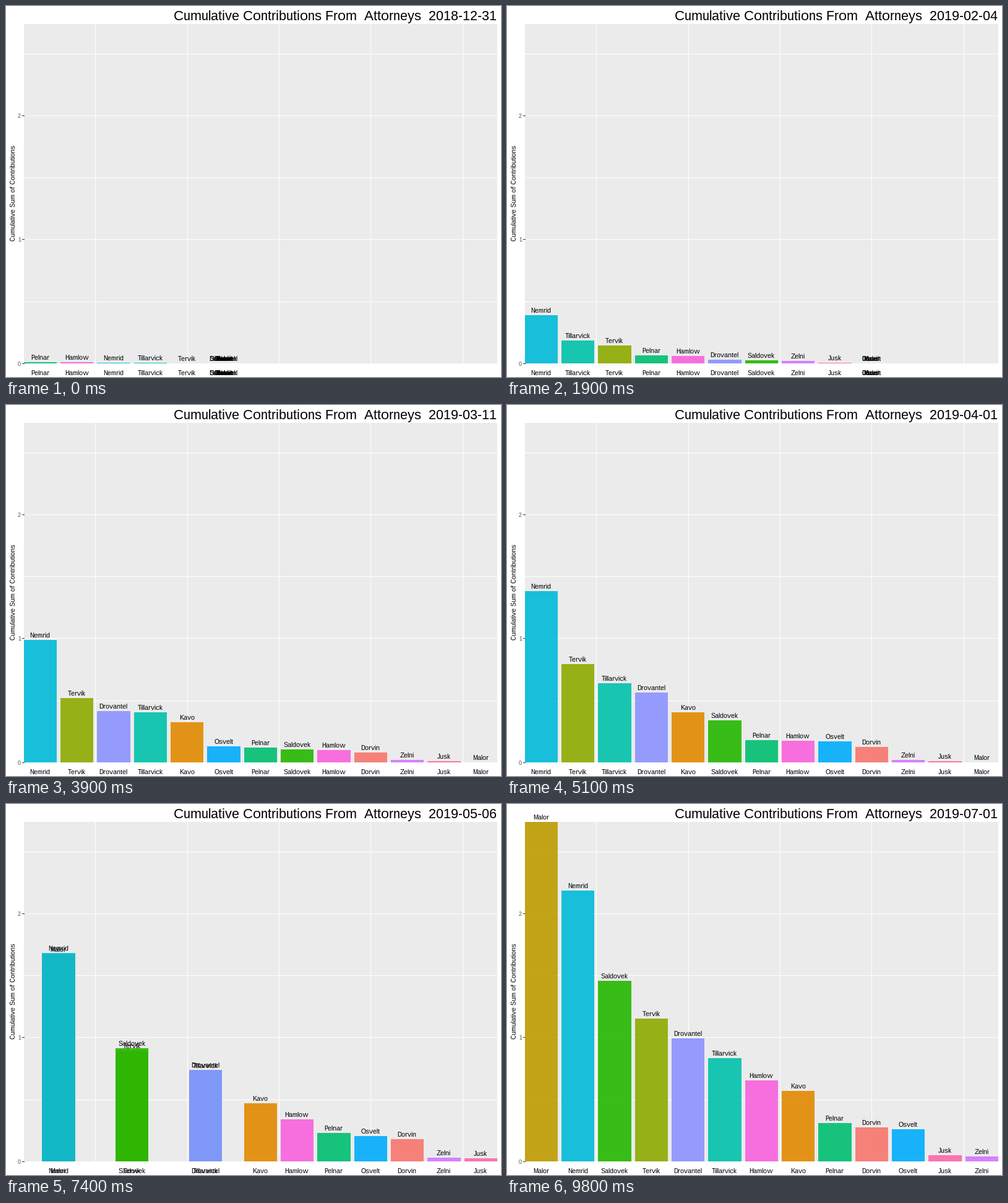
Write a matplotlib script that moves like this. It is 800x600 px and loops after 10000 ms.

```python
import numpy as np
import matplotlib.pyplot as plt
from matplotlib.animation import FuncAnimation
from matplotlib.patches import Rectangle

W, H, DPI = 800, 600, 64
LEFT, RIGHT, TOP, BASE = 28.75, 794, 29, 577.75
STEP = (RIGHT - LEFT) / 12.9      # pixels per rank
UNIT = 200.4                      # pixels per unit of value
START = np.datetime64("2018-12-31")
WEEKS = np.arange(27)
SPRING = 13                       # week where the pace of giving changes


def rise(a, b, bend):
    return np.clip((WEEKS - a) / max(b - a, 1), 0, 1) ** bend


def total(launch, first, spring, last, early=1.15, late=1.15):
    """Running sum: a first haul at launch, then two bent climbs."""
    knee = max(launch, SPRING)
    v = (first + (spring - first) * rise(launch, knee, early)
         + (last - spring) * rise(knee, WEEKS[-1], late))
    return np.where(WEEKS < launch, 0, v)


SERIES = {
    "Dorvin": total(7, .062, .125, .275, early=1.8),
    "Kavo": total(10, .323, .405, .57),
    "Malor": total(16, .87, .87, 2.738, late=.61),
    "Tervik": total(4, .1, .79, 1.149, early=1.25, late=1.45),
    "Saldovek": total(3, .025, .34, 1.458, early=3.84, late=.78),
    "Pelnar": total(1, .055, .18, .31, early=2.3),
    "Tillarvick": total(2, .15, .636, .834, early=2.05, late=.85),
    "Nemrid": total(3, .2, 1.382, 2.183),
    "Osvelt": total(8, .11, .168, .26),
    "Drovantel": total(5, .03, .565, .99, early=.72, late=1.05),
    "Zelni": total(1, .015, .021, .04),
    "Hamlow": total(1, .057, .172, .654, early=3.6, late=1.25),
    "Jusk": total(1, .005, .009, .05),
}
# small sums already in hand before launch
for k, name in enumerate(["Pelnar", "Hamlow", "Nemrid", "Tillarvick", "Tervik"]):
    SERIES[name] = np.maximum(SERIES[name], 0.0105 - 0.0024 * k)

values = np.array(list(SERIES.values())).T
ranks = 1 + (values[:, None, :] > values[:, :, None]).sum(axis=2)
# four frames per week, three in the last five weeks
arrive = [4 * w - 1 - max(w - 21, 0) for w in WEEKS[1:]]


def hcl(hue, chroma=100, lum=65):
    """Polar CIELUV colour as sRGB."""
    h = np.radians(hue)
    u = chroma * np.cos(h) / (13 * lum) + 0.19784
    v = chroma * np.sin(h) / (13 * lum) + 0.46834
    y = ((lum + 16) / 116) ** 3
    x = 9 * y * u / (4 * v)
    z = 3 * y / v - 5 * y - x / 3
    rgb = np.array([3.2406 * x - 1.5372 * y - 0.4986 * z,
                    -0.9689 * x + 1.8758 * y + 0.0415 * z,
                    0.0557 * x - 0.2040 * y + 1.0570 * z]).clip(0, 1)
    return np.where(rgb > 0.0031308, 1.055 * rgb ** (1 / 2.4) - 0.055, 12.92 * rgb)


plt.rcParams.update({
    "font.family": "Liberation Sans",
    "text.hinting": "native",
    "text.hinting_factor": 1,     # whole-pixel advances
    "text.kerning_factor": 6,     # no kerning
})
fig = plt.figure(figsize=(W / DPI, H / DPI), dpi=DPI, facecolor="white")
ax = fig.add_axes([0, 0, 1, 1])
ax.set_xlim(0, W)
ax.set_ylim(H, 0)
ax.axis("off")


def text(x, y, s, px, **kw):
    kw = {"ha": "center", "va": "baseline", "color": "black", "zorder": 4, **kw}
    return ax.text(x, y, s, fontsize=px * 72 / DPI, **kw)


def line(xs, ys, color):
    ax.plot(xs, ys, color=color, lw=72 / DPI, antialiased=False,
            solid_capstyle="butt", zorder=1)


def x_pos(rank):
    return LEFT + (rank - 0.55) * STEP


def y_pos(value):
    return BASE - value * UNIT


ax.add_patch(Rectangle((LEFT, TOP), RIGHT - LEFT, BASE - TOP,
                       fc="#EBEBEB", lw=0, antialiased=False, zorder=0))
for v in np.arange(0, 2.6, 0.5):
    line([LEFT, RIGHT], [y_pos(v)] * 2, "white")
for r in np.arange(2.5, 13, 2.5):
    line([x_pos(r)] * 2, [TOP, BASE], "white")
for v in range(3):
    line([26, LEFT], [y_pos(v)] * 2, "#333333")
    text(24, y_pos(v) + 4, str(v), 9, ha="right", color="#4D4D4D")
text(12, 303, "Cumulative Sum of Contributions", 11, rotation=90, va="center")
title = text(271, 23, "", 22, ha="left")

bars, tops, feet = [], [], []
for i, name in enumerate(SERIES):
    bar = Rectangle((0, BASE), 0.9 * STEP, 0, fc=hcl(15 + 360 * i / len(SERIES)),
                    alpha=0.9, lw=0, antialiased=False, zorder=2 + i / 100)
    bars.append(ax.add_patch(bar))
    tops.append(text(0, 0, name, 11))
    feet.append(text(0, 597, name, 11))


def pose(frame):
    """Current week, with ranks and values halfway while a change is under way."""
    week = sum(a <= frame for a in arrive)
    after = week + 1 if frame + 1 in arrive else week
    return (week, (ranks[week] + ranks[after]) / 2,
            (values[week] + values[after]) / 2)


def draw(frame):
    week, rank, value = pose(frame)
    date = START + np.timedelta64(7 * int(week), "D")
    title.set_text(f"Cumulative Contributions From  Attorneys  {date}")
    for bar, top, foot, r, v in zip(bars, tops, feet, rank, value):
        x, y = x_pos(r), y_pos(v)
        bar.set_xy((x - 0.45 * STEP, y))
        bar.set_height(BASE - y)
        top.set_position((x - 0.5, y - 4))
        foot.set_x(x - 0.5)
    return [title, *bars, *tops, *feet]


anim = FuncAnimation(fig, draw, frames=100, interval=100,
                     repeat=True, repeat_delay=0, blit=False)
plt.show()
```
